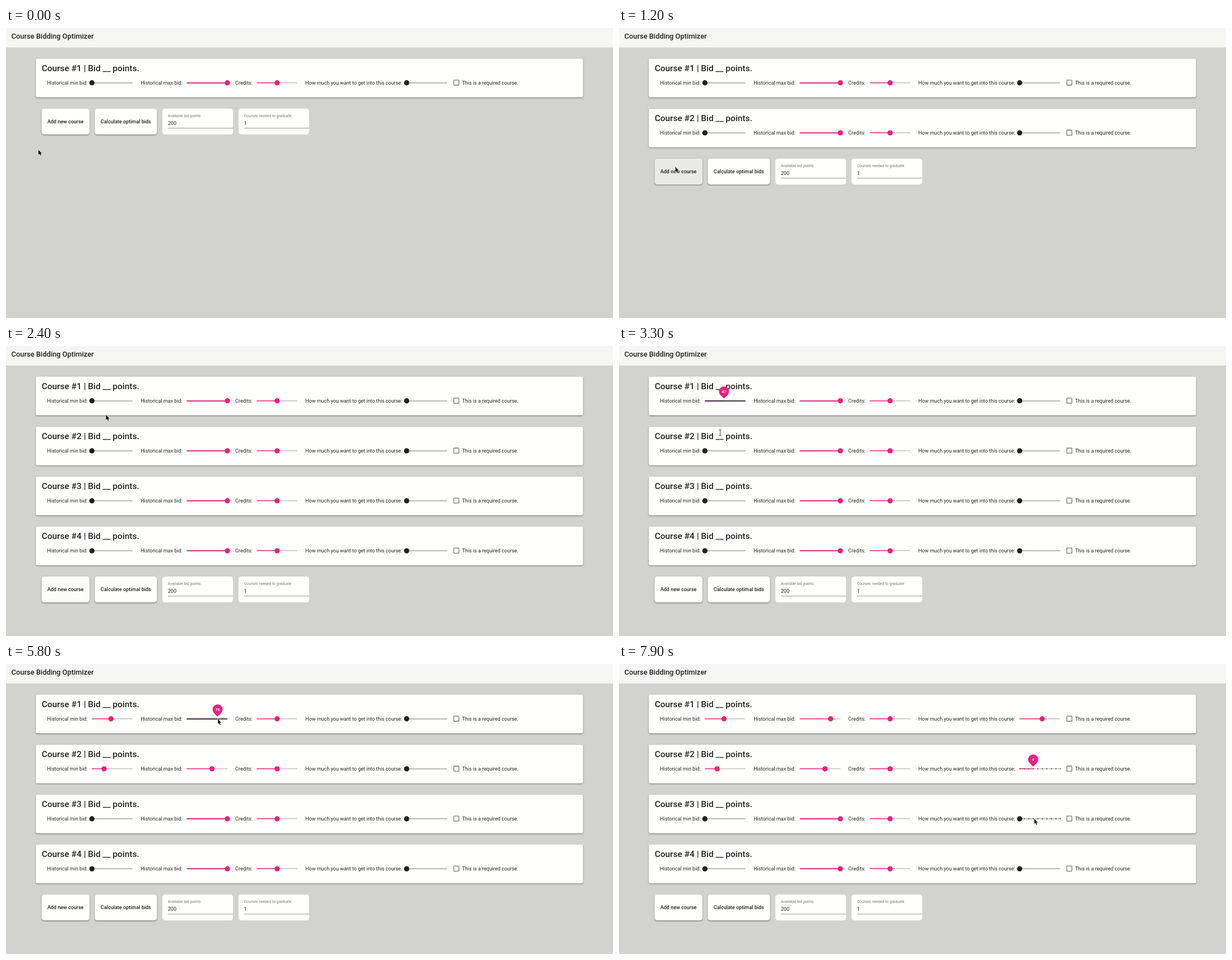
These frames come from a looping animation (1083x517 px, 8 s). An HTML page with a canvas:

```html
<!DOCTYPE html>
<html lang="en">
<head>
<meta charset="utf-8">
<title>Course Bidding Optimizer</title>
<style>
  html, body { margin: 0; width: 100%; height: 100%; overflow: hidden; background: #d2d3ce; }
  canvas { display: block; }
</style>
</head>
<body>
<canvas id="stage" width="1083" height="517"></canvas>
<script>
const ctx = document.getElementById('stage').getContext('2d');
const LOOP = 8000, STEP = 100, ROW = 89.1, TRACK = 72.3;
const PINK = '#ec1f80', INK = '#212121', PAPER = '#fffffb';

const SLIDERS = [
  { label: 'Historical min bid:', labelX: 73.3, x: 153.3, value: 0, min: 0, max: 100 },
  { label: 'Historical max bid:', labelX: 240.2, x: 322.6, value: 100, min: 0, max: 100 },
  { label: 'Credits:', labelX: 409.1, x: 447.5, value: 5, min: 0, max: 10 },
  { label: 'How much you want to get into this course:', labelX: 534.1, x: 714.8, value: 1, min: 1, max: 10 },
];
// Each slider keeps the focus until the next one is clicked.
const CLICKS = [
  { at: 2700, course: 0, slider: 0, value: 47 },
  { at: 3600, course: 1, slider: 0, value: 30 },
  { at: 4300, course: 1, slider: 1, value: 62 },
  { at: 5400, course: 0, slider: 1, value: 76 },
  { at: 6700, course: 0, slider: 3, value: 6 },
  { at: 7300, course: 1, slider: 3, value: 4 },
];
const ADDED = [600, 1300, 1700];
// Ripple start and centre, relative to the first row.
const RIPPLES = [[530, 95, 178], [1200, 100, 158], [1600, 100, 157.5]];
// Pointer stops: time, x, y
const STOPS = [
  [0, 57.3, 216.5], [100, 58.5, 218.5], [200, 58.5, 218.5], [500, 95, 178], [600, 95, 183],
  [700, 94.7, 190.5], [1100, 100, 247], [1300, 100, 247], [1600, 100, 335.7], [2000, 100, 335.7],
  [2500, 187, 97.5], [2900, 187, 97.5], [3300, 180.5, 154.5], [3500, 175, 186.5], [3700, 175, 186.5],
  [4200, 367.4, 187], [4500, 367.4, 187], [4700, 374.5, 187], [5300, 377.5, 97.5], [6100, 377.5, 97.5],
  [6600, 755, 97.5], [6800, 755, 97.5], [7200, 739, 186.5], [7500, 739, 186.5], [7900, 740.5, 275.5],
];

const clamp = v => Math.max(0, Math.min(1, v));
const easeOut = p => 1 - (1 - clamp(p)) ** 3;
const courseCount = t => 1 + ADDED.filter(at => t >= at).length;

function pointer(t) {
  const next = STOPS.findIndex(stop => stop[0] > t);
  if (next < 1) return STOPS[next < 0 ? STOPS.length - 1 : 0].slice(1);
  const [t0, x0, y0] = STOPS[next - 1], [t1, x1, y1] = STOPS[next];
  const p = (t - t0) / (t1 - t0), k = p * p * (3 - 2 * p);
  return [x0 + (x1 - x0) * k, y0 + (y1 - y0) * k];
}

function text(str, x, y, size, { weight = 400, color = INK, align = 'left' } = {}) {
  ctx.font = `${weight} ${size}px Roboto, sans-serif`;
  ctx.textAlign = align;
  ctx.fillStyle = color;
  ctx.fillText(str, x, y);
}

function rect(x, y, w, h, color) {
  ctx.fillStyle = color;
  ctx.fillRect(x, y, w, h);
}

function disc(x, y, r, color) {
  ctx.beginPath();
  ctx.arc(x, y, Math.max(0, r), 0, 7);
  ctx.fillStyle = color;
  ctx.fill();
}

function panel(x, y, w, h, radius, raised) {
  ctx.save();
  if (raised) {
    ctx.shadowColor = 'rgba(0,0,0,.42)';
    ctx.shadowBlur = 2.4;
    ctx.shadowOffsetY = 1.1;
  }
  ctx.beginPath();
  ctx.roundRect(x, y, w, h, radius);
  ctx.fillStyle = PAPER;
  ctx.fill();
  ctx.restore();
}

function bubble(x, y, scale, value) {
  if (scale < 0.02) return;
  ctx.save();
  ctx.translate(x, y - 16.7 * scale);
  ctx.scale(scale, scale);
  ctx.beginPath();
  ctx.arc(0, 0, 9, Math.PI * 0.75, Math.PI * 0.25);
  ctx.lineTo(0, 12.73);
  ctx.fillStyle = PINK;
  ctx.fill();
  text(value, 0, 2.7, 7.7, { weight: 500, color: '#fff', align: 'center' });
  ctx.restore();
}

function sliderState(t, course, index) {
  const s = SLIDERS[index];
  const portion = v => (v - s.min) / (s.max - s.min);
  const state = { value: s.value, at: portion(s.value), focus: 0, active: false };
  CLICKS.forEach((click, i) => {
    if (click.course !== course || click.slider !== index || t < click.at) return;
    const end = CLICKS[i + 1]?.at ?? Infinity;
    state.at += (portion(click.value) - state.at) * easeOut((t - click.at) / 400);
    state.value = click.value;
    state.focus = easeOut((t - click.at) / 300) * (1 - easeOut((t - end) / 300));
    state.active = t < end;
  });
  return state;
}

function slider(t, course, index, [px, py]) {
  const { x, min, max } = SLIDERS[index], y = 97.8 + ROW * course;
  const { value, at, focus, active } = sliderState(t, course, index);
  const hovered = px > x - 5 && px < x + TRACK + 5 && Math.abs(py - y) < 15;
  const edge = at === 0 || at === 1;
  const top = Math.round(y - 0.9), height = edge ? 1.9 : 1.4, knob = x + TRACK * at;

  rect(x, top, TRACK, height, edge ? '#b6b6b3' : '#bdbdba');
  rect(x, top, TRACK * at, height, PINK);
  if (hovered || active) {
    const count = max - min;
    if (count > 50) rect(x, top, TRACK, 1.8, 'rgba(20,14,20,.85)');
    else for (let i = 0; i <= count; i++) rect(x - 0.3 + TRACK * i / count, top, 1.4, 1.7, INK);
  }
  disc(knob, y, 4.7 * (1 - focus), at === 0 ? INK : PINK);
  bubble(knob, y, focus, value);
}

function course(t, i, cursor) {
  const y = ROW * i;
  panel(53.2, 54.8 + y, 976.3, 68.8, 2.8, true);
  text(`Course #${i + 1} | Bid __ points.`, 63.7, 76.5 + y, 15.43, { weight: 500 });
  SLIDERS.forEach((s, index) => text(s.label, s.labelX, 100.7 + y, 9));
  SLIDERS.forEach((s, index) => slider(t, i, index, cursor));
  ctx.strokeStyle = '#757573';
  ctx.lineWidth = 1.3;
  ctx.beginPath();
  ctx.roundRect(798.9, 92.9 + y, 9.1, 9.1, 0.7);
  ctx.stroke();
  text('This is a required course.', 813.7, 100.7 + y, 9);
}

function hoversAdd(t) {
  const [x, y] = pointer(t), top = 143.8 + ROW * (courseCount(t) - 1);
  return x > 63.5 && x < 149 && y > top && y < top + 46;
}

function addButton(t, y) {
  panel(63.5, 143.8, 85.5, 46, 4.5, true);
  ctx.save();
  ctx.beginPath();
  ctx.roundRect(63.5, 143.8, 85.5, 46, 4.5);
  ctx.clip();
  const hover = (hoversAdd(t) + hoversAdd(t - STEP)) * 0.02;
  rect(63, 143, 87, 48, `rgba(0,0,0,${hover})`);
  for (const [at, x, cy] of RIPPLES) {
    const age = t - at;
    if (age < 0 || age > 850) continue;
    const reach = Math.hypot(Math.max(x - 63.5, 149 - x), Math.max(cy - 143.8, 189.8 - cy));
    disc(x, cy, reach * easeOut(age / 450), `rgba(0,0,0,${0.11 * clamp((850 - age) / 400)})`);
  }
  ctx.restore();
  text('Add new course', 106.1, 169.8, 9, { weight: 500, align: 'center' });
}

function field(x, label, value) {
  panel(x, 143.8, 126, 46, 4.5, false);
  text(label, x + 9.8, 159, 6.75, { color: '#777774' });
  text(value, x + 9.8, 172.7, 9);
  rect(x + 9.8, 178, 116.2, 1, '#949491');
}

function drawPointer(x, y, count) {
  const local = (y - 54.8) % ROW;
  const onTitle = x > 64 && x < 238 && y > 55 && y < 55 + ROW * count && local > 7 && local < 26;
  ctx.save();
  ctx.translate(x, y);
  if (onTitle) {
    const beam = new Path2D('M-2.5-5.2H-.7L0-4.7L.7-5.2H2.5M0-4.7V4.7M-2.5 5.2H-.7L0 4.7L.7 5.2H2.5');
    ctx.strokeStyle = 'rgba(255,255,255,.6)';
    ctx.lineWidth = 2;
    ctx.stroke(beam);
    ctx.strokeStyle = '#444';
    ctx.lineWidth = 1;
    ctx.stroke(beam);
  } else {
    const arrow = new Path2D('M.5.5V9.6L2.5 7.7L4 11L5.5 10.3L4 7.2H6.8Z');
    ctx.strokeStyle = 'rgba(255,255,255,.75)';
    ctx.lineWidth = 1.2;
    ctx.stroke(arrow);
    ctx.fillStyle = '#111';
    ctx.fill(arrow);
  }
  ctx.restore();
}

function draw(t) {
  const count = courseCount(t), cursor = pointer(t);
  rect(0, 0, 1083, 517, '#d2d3ce');
  rect(0, 0, 1083, 34.8, '#f5f5f1');
  text('Course Bidding Optimizer', 9.6, 19, 12.86, { weight: 500 });
  for (let i = 0; i < count; i++) course(t, i, cursor);

  ctx.save();
  ctx.translate(0, ROW * (count - 1));
  addButton(t);
  panel(158.3, 143.8, 111, 46, 4.5, true);
  text('Calculate optimal bids', 213.8, 169.8, 9, { weight: 500, align: 'center' });
  field(279, 'Available bid points', '200');
  field(414.9, 'Courses needed to graduate', '1');
  ctx.restore();

  drawPointer(...cursor, count);
}

function tick() {
  draw(Math.floor(performance.now() % LOOP / STEP) * STEP);
  requestAnimationFrame(tick);
}
tick();
</script>
</body>
</html>
```
